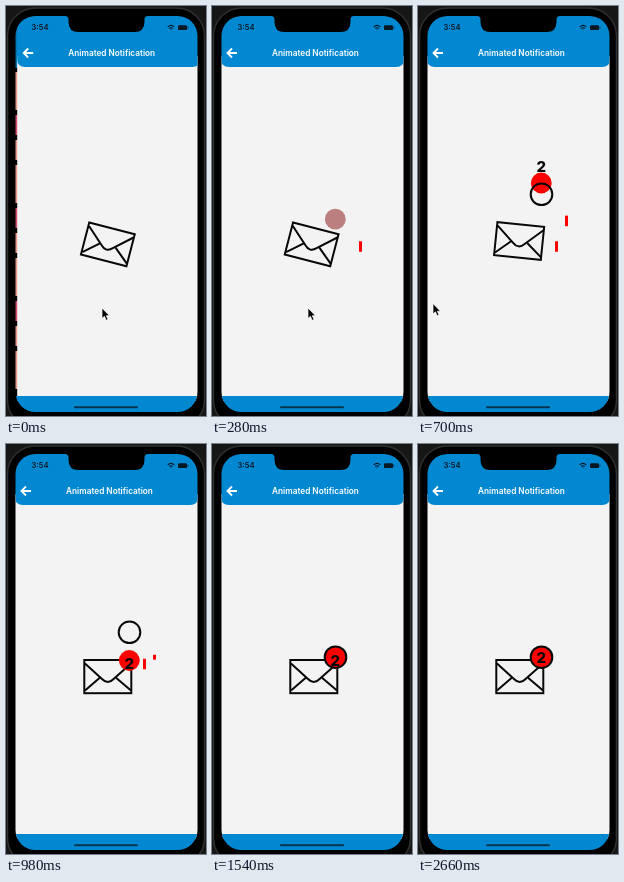
These frames come from a looping animation (200x410 px, 3920 ms). An HTML page:

```html
<!DOCTYPE html>
<html lang="en">
<head>
<meta charset="utf-8">
<title>Animated Notification</title>
<style>
  html, body { margin: 0; width: 100%; height: 100%; overflow: hidden; background: #161616; }
  svg { display: block; width: 100vw; height: 100vh; }
  text { font-family: Inter, Roboto, sans-serif; text-anchor: middle; }
  .line { fill: none; stroke: #080808; stroke-width: 2; }
</style>
</head>
<body>
<svg viewBox="0 0 200 410">
  <defs>
    <clipPath id="screen"><rect x="9.5" y="10" width="182" height="396" rx="20"/></clipPath>
  </defs>

  <rect x="1.5" y="2" width="197" height="420" rx="28" fill="#000" stroke="#303032" stroke-width="1.5"/>

  <g clip-path="url(#screen)">
    <g id="previous"><rect x="9" y="10" width="8" height="52" fill="#0277b8"/></g>

    <g id="page">
      <rect x="9" y="50" width="190" height="345" fill="#f3f3f3"/>
      <path d="M9 10H192V53q0 8-8 8H17q-8 0-8-8z" fill="#0288d1"/>
      <path d="M25 47H16M20 42.5L15.5 47L20 51.5" fill="none" stroke="#fff" stroke-width="1.8"/>
      <text x="103.500" y="49.500" font-size="8.250" font-weight="600" fill="#fff">Animated Notification</text>

      <g id="envelope" class="line">
        <rect x="78.300" y="216" width="47" height="33.200"/>
        <path d="M79 219.500L96 235Q101.800 241 107.600 235L125 219.500M79 246.500L93.500 234M125 246.500L110.300 234"/>
      </g>

      <rect id="farBar" x="147" width="3" fill="#f00"/>
      <rect id="nearBar" x="137" width="3" fill="#f00"/>
      <circle id="badge" cx="123.300" r="10.400"/>
      <circle id="ring" class="line" cx="123.500" r="10.800"/>
      <text id="count" x="123.300" font-size="15" font-weight="800" fill="#080808">2</text>
    </g>

    <rect x="9" y="390" width="183" height="20" fill="#0288d1"/>
    <rect x="68" y="400.200" width="64" height="2" rx="1" fill="#06364f"/>

    <path d="M59 10q3.500 0 3.500 3.500V16q0 10 10 10h56q10 0 10-10V13.500q0-3.500 3.500-3.500z" fill="#000"/>
    <text x="34" y="24.300" font-size="7.600" font-weight="600" fill="#061824">3:54</text>
    <path d="M161.700 20.800q3.300-3 6.600 0M163.200 22.500q1.800-1.600 3.600 0M164.600 23.700h.8"
          fill="none" stroke="#061824" stroke-width="1.100"/>
    <rect x="172" y="19.300" width="9" height="4.800" rx="1.200" fill="#061824"/>
    <rect x="181.500" y="20.800" width=".8" height="1.800" fill="#061824"/>
  </g>

  <path id="cursor" d="M0 0V10.500L2.400 8.300L4.200 12.300L6 11.500L4.300 7.700H7.400z"
        fill="#000" stroke="#fff" stroke-width=".7"/>
</svg>

<script>
const LOOP = 3920, STEP = 140;
const REST = 213.2, FADE_END = 3;
const el = id => document.getElementById(id);
const set = (id, attrs) => {
  for (const name in attrs) el(id).setAttribute(name, attrs[name]);
};
const show = (id, visible) => set(id, { visibility: visible ? 'visible' : 'hidden' });
const progress = (step, from, to) => Math.min(1, Math.max(0, (step - from) / (to - from)));
const mix = (a, b, p) => a + (b - a) * p;
const easeOut = p => 1 - (1 - p) ** 2;

// Slivers of the list page at the left edge while it slides out.
for (let y = 66, row = 0; y < 365; row++) {
  const height = row % 3 ? 20 : 38;
  const fill = row % 3 === 1 ? '#d54d6c' : '#e99a88';
  el('previous').innerHTML += `<rect x="9" y="${y}" width="8" height="${height}" fill="${fill}"/>`;
  y += height + 5;
}

// Rise from rest by `lift`, hang, then drop past the rest line and settle.
function hop(step, lift, fallStart, landing, overshoot, settle) {
  if (step <= fallStart) return REST - lift * easeOut(progress(step, 2, 5));
  if (step <= landing) return mix(REST - lift, REST + overshoot, progress(step, fallStart, landing));
  return REST + overshoot * (1 - progress(step, landing, landing + settle));
}

// A streak shoots up to the rest line, then shrinks away.
function streak(id, step, start) {
  const rise = easeOut(progress(step, start, start + 4));
  const height = mix(10.5, 2, progress(step, start + 3, start + 6));
  show(id, step >= start && step < 10);
  set(id, { y: mix(240.5, REST, rise) - height / 2, height });
}

function draw(step) {
  const faded = step < FADE_END;
  const cursorMove = easeOut(progress(step, 3, 5));

  set('page', { transform: `translate(${mix(2.2, 0, progress(step, 0, 2))})` });
  show('previous', step < 2);
  set('envelope', { transform: `rotate(${mix(14.5, 0, progress(step, 2, 7))} 78 227)` });

  show('badge', step > 0);
  set('badge', {
    cy: hop(step, 36.2, 6, 7, 3.3, 3),
    fill: faded ? '#830d0d' : '#f00',
    opacity: faded ? step / 4 : 1
  });
  show('ring', !faded);
  set('ring', { cy: hop(step, 24.9, 7, 8, 4.8, 2) });
  show('count', !faded);
  set('count', { y: 5.5 + hop(step, 53.2, 5, 7, 5.8, 8) });

  streak('farBar', step, 2);
  streak('nearBar', step, 5);

  show('cursor', step < 6);
  set('cursor', { transform: `translate(${mix(96, 15, cursorMove)} ${mix(302, 297.5, cursorMove)})` });
}

function tick() {
  draw(Math.floor(performance.now() % LOOP / STEP));
  requestAnimationFrame(tick);
}
tick();
</script>
</body>
</html>
```
